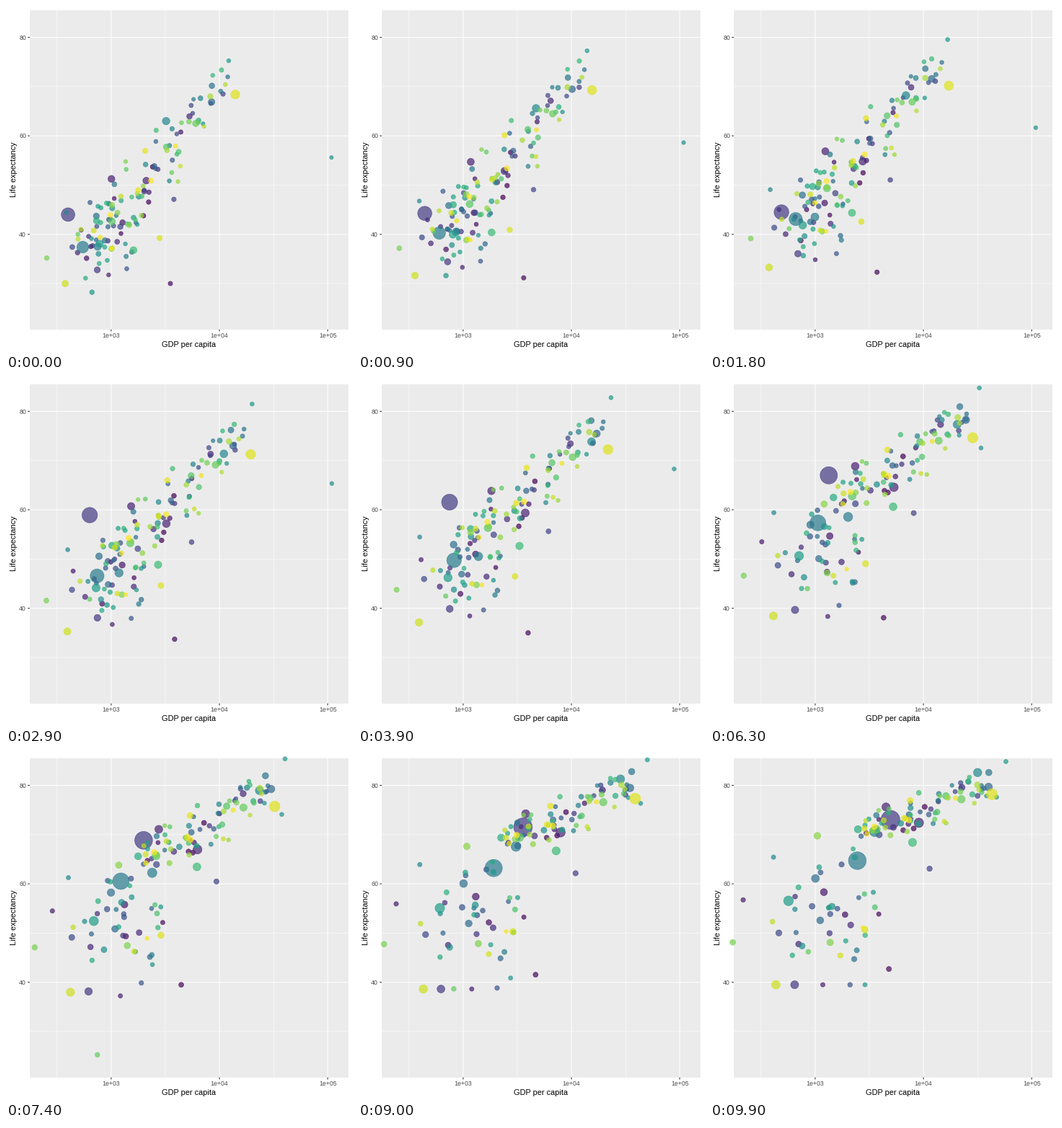
Write a matplotlib script that moves like this. It is 480x480 px and loops after 10000 ms.

```python
import matplotlib.pyplot as plt
import numpy as np
from matplotlib.animation import FuncAnimation
from matplotlib.patches import Rectangle

SIZE, DPI = 480, 72
FRAMES, INTERVAL = 100, 100
SURVEYS = np.arange(12)      # one data point every nine frames
COUNT, SLOW = 142, 48
PANEL = (32.9, 5.5, 474.5, 448.7)
FONT = "Liberation Sans"
rng = np.random.default_rng(52)


def px(log_income):
    return 145.9 + 150.2 * (log_income - 3)


def py(life):
    return 316.7 - 6.83 * (life - 40)


def spread(n):
    v = rng.normal(size=n)
    return (v - v.mean()) / v.std()


def blend(*values):
    """Values spaced evenly over the loop, one row per survey."""
    stops = np.linspace(0, SURVEYS[-1], len(values))
    return np.interp(SURVEYS, stops, values)[:, None]


def wander(n, step):
    return np.cumsum(rng.normal(0, step, (len(SURVEYS), n)), axis=0)


def crowd(n, growth):
    pop = np.clip(10 ** (0.7 + 0.5 * spread(n)), 0.1, 70)
    return pop * blend(1, growth)


def leader(rank, pop, *stops):
    """A path through (survey, income, life expectancy) stops."""
    when, income, life = zip(*stops)
    track = (np.interp(SURVEYS, when, np.log10(income)),
             np.interp(SURVEYS, when, life),
             np.linspace(*pop, len(SURVEYS)))
    return rank, [v[:, None] for v in track]


def slow_group(n):
    """Low incomes: life expectancy climbs, stalls and fans out."""
    rich, late = spread(n), spread(n)
    x = blend(2.96, 3.05, 3.1) + blend(0.21, 0.3) * rich + blend(0, 0.15) * late
    y = blend(39.5, 50, 52.5) + blend(4, 5, 6.5) * spread(n)
    y = y + 2.2 * rich + blend(0, 0, 3.5) * spread(n)
    return x + wander(n, 0.02), np.maximum(y, blend(30, 39.5)), crowd(n, 3)


def fast_group(n):
    """Growing incomes: a steep loose cloud settles into a tight band."""
    u = np.linspace(0, 1, n)
    x = blend(2.8, 3.35) + blend(1.22, 1.26) * u
    x = x + blend(0.13, 0.08) * spread(n) + wander(n, 0.018)
    trend = blend(70, 75) + blend(28, 9.5) * (x - 4)
    loose = blend(6.5, 2.6) * (1 - blend(0.75, 0.4) * u)
    return x, trend + loose * spread(n), crowd(n, 1.9)


def build():
    leaders = [
        leader(24, (556, 1319), (0, 400, 44), (2, 488, 44.5), (3, 613, 58.4),
               (6, 962, 65.5), (11, 4959, 73)),
        leader(58, (372, 1110), (0, 547, 37.4), (8, 1164, 60.2),
               (11, 2452, 64.7)),
        leader(134, (157, 301), (0, 13990, 68.4), (11, 42952, 78.2)),
        leader(66, (86, 127), (0, 3217, 63), (4, 14779, 73.4),
               (11, 31656, 82.6)),
        leader(59, (82, 224), (0, 750, 37.5), (11, 3541, 70.6)),
        leader(14, (57, 190), (0, 2109, 50.9), (11, 9066, 72.4)),
        leader(71, (0.2, 2.5), (0, 108382, 55.6), (4, 109348, 67.7),
               (6, 31354, 71.3), (11, 47307, 77.6)),
        leader(107, (2.5, 8.9), (0, 493, 40), (7, 848, 44), (8, 737, 23.6),
               (11, 863, 46.2)),
        leader(3, (4.2, 12.4), (0, 3521, 30), (11, 4797, 42.7)),
    ]
    named = [rank for rank, _ in leaders]
    parts = [slow_group(SLOW), fast_group(COUNT - SLOW - len(leaders))]
    parts += [track for _, track in leaders]
    x, y, pop = (np.hstack(p) for p in zip(*parts))
    others = np.setdiff1d(np.arange(COUNT), named)
    order = np.argsort(np.concatenate([rng.permutation(others), named]))
    size = 2 + 10 * np.sqrt(pop / 1319)
    radius = 0.375 * (size * 2.845 + 0.94)
    return px(x)[:, order], py(y)[:, order], radius[:, order]


fig = plt.figure(figsize=(SIZE / DPI, SIZE / DPI), dpi=DPI, facecolor="white")
ax = fig.add_axes([0, 0, 1, 1])
ax.set(xlim=(0, SIZE), ylim=(SIZE, 0))
ax.axis("off")

left, top, right, bottom = PANEL
ax.add_patch(Rectangle((left, top), right - left, bottom - top,
                       fc="#EBEBEB", lw=0))


def line(xs, ys, width, color="white"):
    ax.plot(xs, ys, color=color, lw=width, snap=False,
            solid_capstyle="butt", zorder=1)


def label(x, y, text, size=8.8, color="#4D4D4D", **kw):
    ax.text(x, y, text, size=size, color=color, family=FONT,
            va="baseline", **kw)


for v in (2.5, 3.5, 4.5):
    line([px(v)] * 2, [top, bottom], 0.53)
for v in (30, 50, 70):
    line([left, right], [py(v)] * 2, 0.53)
for v in (3, 4, 5):
    line([px(v)] * 2, [top, bottom], 1.07)
    line([px(v)] * 2, [bottom, bottom + 2.74], 1.07, "#333333")
    label(px(v), 460, f"1e+{v:02d}", ha="center")
for v in (40, 60, 80):
    line([left, right], [py(v)] * 2, 1.07)
    line([left - 2.74, left], [py(v)] * 2, 1.07, "#333333")
    label(28, py(v) + 3.1, str(v), ha="right")
label((left + right) / 2, 472.8, "GDP per capita", 11, "black", ha="center")
label(14, (top + bottom) / 2, "Life expectancy", 11, "black",
      ha="center", rotation=90, rotation_mode="anchor")

X, Y, R = build()
colors = plt.cm.viridis(np.linspace(0, 1, COUNT), alpha=0.7)
dots = ax.scatter(X[0], Y[0], s=(2 * R[0]) ** 2, facecolors=colors,
                  edgecolors=colors, linewidths=0.71, zorder=2)


def update(frame):
    pos = frame / (FRAMES - 1) * SURVEYS[-1]
    i = min(int(pos), len(SURVEYS) - 2)
    f = pos - i
    x, y, r = (a[i] + (a[i + 1] - a[i]) * f for a in (X, Y, R))
    dots.set_offsets(np.column_stack([x, y]))
    dots.set_sizes((2 * r) ** 2)
    return (dots,)


anim = FuncAnimation(fig, update, frames=FRAMES, interval=INTERVAL,
                     repeat=True, repeat_delay=0, blit=False)
plt.show()
```
